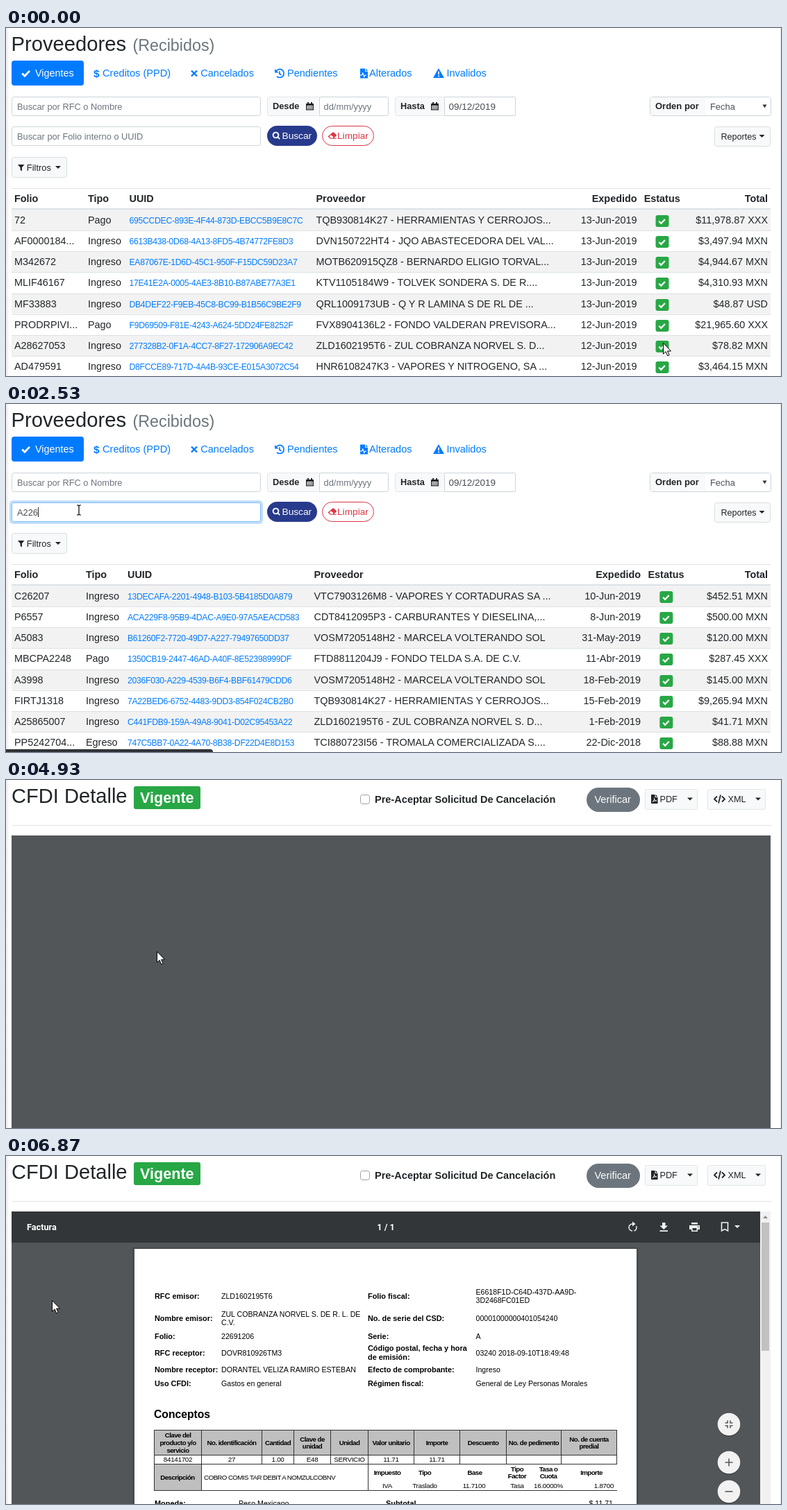
Animation of 1116x502 px, one loop 7.79 s. Source, as an HTML page:

```html
<!DOCTYPE html>
<html lang="es">
<head>
<meta charset="utf-8">
<title>Proveedores</title>
<style>
  html, body { margin: 0; width: 100%; height: 100%; overflow: hidden; background: #fff; }
  svg { display: block; width: 1116px; height: 502px; overflow: hidden; }
  text { font-family: "Liberation Sans", Arial, sans-serif; }
  .bold { font-weight: 700; }
  .end { text-anchor: end; }
  .mid { text-anchor: middle; }
  .tight { letter-spacing: -.55px; }
  .snug { letter-spacing: -.28px; }
  .roboto { font-family: Roboto, sans-serif; font-weight: 700; }
</style>
</head>
<body>
<svg id="stage" viewBox="0 0 1116 502"></svg>
<script>
const LOOP = 7790;
const INK = '#212529', BLUE = '#007bff', GREEN = '#28a745', RED = '#dc3545';
const MUTED = '#6c757d', LINE = '#dee2e6', LIGHT = '#f8f9fa', FIELD = '#ced4da';

// Drawing helpers
const text = (x, y, s, size = 14.4, fill = INK, cls = '') =>
  `<text x="${x}" y="${y}" font-size="${size}" fill="${fill}" class="${cls}">${s}</text>`;
const bold = (x, y, s, size, fill, cls = '') => text(x, y, s, size, fill, 'bold ' + cls);
const rect = (x, y, w, h, fill, r = 0, stroke = 'none') =>
  `<rect x="${x}" y="${y}" width="${w}" height="${h}" rx="${r}" fill="${fill}" stroke="${stroke}"/>`;
const box = (x1, y1, x2, y2, fill, r = 0, stroke = FIELD) =>
  rect(x1 + .5, y1 + .5, x2 - x1 - 1, y2 - y1 - 1, fill, r, stroke);
const shape = (x, y, d, fill, scale = 1) =>
  `<path transform="translate(${x} ${y}) scale(${scale})" d="${d}" fill="${fill}"/>`;
const stroke = (x, y, d, color, w = 2) =>
  `<path transform="translate(${x} ${y})" d="${d}" fill="none" stroke="${color}" stroke-width="${w}"/>`;
const group = (id, body) => `<g id="${id}">${body}</g>`;
const down = (x, y, color = INK) => shape(x, y, 'M0 0h8l-4 4z', color);
const tick = (x, y, s, color) => stroke(x, y, `M${-5 * s} 0l${3.6 * s} ${3.6 * s} ${6.6 * s} ${-7 * s}`, color, 2.6 * s);
const calendar = (x, y) =>
  shape(x, y, 'M0 2h2V0h2v2h3V0h2v2h2v9.5H0zM1.4 5v5.2h8.2V5zM2.4 6h1.7v1.2H2.4zM4.8 6h1.7v1.2H4.8zM7.2 6h1.7v1.2H7.2zM2.4 8.2h1.7v1.2H2.4zM4.8 8.2h1.7v1.2H4.8zM7.2 8.2h1.7v1.2H7.2z', INK);

const dateField = (x, label, inputX, endX, value, color, size) =>
  box(x, 99, endX, 127, LIGHT, 3, '#e3e6ea') + bold(x + 8, 117, label, 12.8) +
  calendar(inputX - 19, 107) + box(inputX, 99, endX, 127, '#fff', 2) + text(inputX + 6.5, 118, value, size, color);

const listLeft =
  text(7.5, 33, 'Proveedores', 29.2) + text(182.5, 33, '(Recibidos)', 23.3, MUTED) +
  rect(8, 47, 104, 36, BLUE, 4) + tick(28.5, 65.5, 1.05, '#fff') + text(42, 70, 'Vigentes', 14.4, '#fff') +
  bold(126, 71, '$', 15.5, BLUE) + text(139, 70, 'Creditos (PPD)', 14.6, BLUE) +
  stroke(271, 65.5, 'M-4-4L4 4M4-4L-4 4', BLUE, 2.4) + text(280.3, 70, 'Cancelados', 14.5, BLUE) +
  stroke(394, 65.5, 'M-4.8-3.4A6 6 0 1 1-4 4.3M-.2-3.2V.5l2.8 1.8', BLUE, 1.7) + shape(387, 59, 'M0 0V5.5H5.5z', BLUE) +
  text(405, 70, 'Pendientes', 14.5, BLUE) +
  shape(509, 58.5, 'M1 0h7v4.2h4V14H1z', BLUE) + shape(509, 58.5, 'M9 0l3 3.2H9z', BLUE) +
  stroke(509, 58.5, 'M0 9.5h3.5l1.3-3 2 5.5 1.3-2.5H10', '#fff', 1.1) + text(523, 70, 'Alterados', 14.6, BLUE) +
  shape(615, 58, 'M7.9 0L16 14H0zM7 4.8l.3 4.4h1.4L9 4.8zM7 10.4v1.8h2v-1.8z', BLUE) + text(634.5, 70, 'Invalidos', 14.5, BLUE) +
  box(8, 99, 367, 127, '#fff', 3) + text(16, 118, 'Buscar por RFC o Nombre', 12.8, MUTED) +
  dateField(376, 'Desde', 451, 551, 'dd/mm/yyyy', MUTED, 12.9) +
  dateField(560, 'Hasta', 631, 734, '09/12/2019', '#495057', 13.5) +
  box(8, 142, 367, 170, '#fff', 3) +
  rect(376, 141, 72, 29, '#283a8c', 14.5) +
  stroke(389, 154.5, 'M3.4 0A3.9 3.9 0 1 1-4.4 0A3.9 3.9 0 1 1 3.4 0M2.2 2.6L5.2 5.6', '#fff', 1.9) +
  text(397.5, 160, 'Buscar', 13.7, '#fff') +
  box(455, 141, 530, 170, '#fff', 14, RED) +
  shape(464, 150.5, 'M7.5 0h2l4.5 4.3v1.2L9.6 9.7H14V11H3.5L0 7.6V6.6zM4.6 4.3L1.9 7.1 4.3 9.6h2.8L9 7.9z', RED, .85) +
  text(477, 160, 'Limpiar', 13.7, RED) +
  box(8, 186, 88, 216, LIGHT, 3, '#d9dde0') + shape(17, 197, 'M0 0h10.5L6.6 4.8V10.5L4 8.5V4.8z', INK, .9) +
  text(29.8, 205.5, 'Filtros', 12.9) + down(71, 199);

const listRight =
  box(927, 99, 1102, 127, '#fff', 3) + rect(928, 100, 79, 26, LIGHT, 2) + bold(935, 117, 'Orden por', 13) +
  text(1014, 118, 'Fecha', 12.9, '#495057') + shape(1089.5, 110.5, 'M0 0h6l-3 4.8z', '#333') +
  box(1020, 142, 1101, 171, LIGHT, 3, '#d9dde0') + text(1029.5, 160.5, 'Reportes', 12.6) + down(1084.5, 154);

// cols: folio, tipo, uuid, proveedor, expedido (right), estatus, total (right), table end
function table([folio, tipo, uuid, prov, exp, est, total, end], rows, linkId = '') {
  const head = rect(8, 231, end - 8, 1, LINE) + rect(8, 260, end - 8, 2, LINE) +
    bold(folio, 251, 'Folio') + bold(tipo, 251, 'Tipo') + bold(uuid, 251, 'UUID') + bold(prov, 251, 'Proveedor') +
    bold(exp, 251, 'Expedido', 14.4, INK, 'end') + bold(est, 251, 'Estatus') + bold(total, 251, 'Total', 14.4, INK, 'end');
  return head + rows.map((row, i) => {
    const [f, ti, id, p, date, sum] = row.split('|');
    const y = 262 + i * 30.15, base = Math.round(y + 20);
    const link = text(uuid, base, id, 12.2, BLUE, 'snug');
    return rect(8, y, end - 8, 30.15, i % 2 ? '#fff' : '#f2f2f2') + (i ? rect(8, Math.round(y), end - 8, 1, LINE) : '') +
      text(folio, base, f) + text(tipo, base, ti) + (linkId && !i ? group(linkId, link) : link) + text(prov, base, p) +
      text(exp, base, date, 14.4, INK, 'end') + rect(est + 16.8, base - 12, 19, 17, GREEN, 3) +
      tick(est + 25.8, base - 3.2, .85, '#fff') + text(total, base, sum, 14.4, INK, 'end');
  }).join('');
}

const allRows = [
  '72|Pago|695CCDEC-893E-4F44-873D-EBCC5B9E8C7C|TQB930814K27 - HERRAMIENTAS Y CERROJOS...|13-Jun-2019|$11,978.87 XXX',
  'AF0000184...|Ingreso|6613B438-0D68-4A13-8FD5-4B74772FE8D3|DVN150722HT4 - JQO ABASTECEDORA DEL VAL...|13-Jun-2019|$3,497.94 MXN',
  'M342672|Ingreso|EA87067E-1D6D-45C1-950F-F15DC59D23A7|MOTB620915QZ8 - BERNARDO ELIGIO TORVAL...|13-Jun-2019|$4,944.67 MXN',
  'MLIF46167|Ingreso|17E41E2A-0005-4AE3-8B10-B87ABE77A3E1|KTV1105184W9 - TOLVEK SONDERA S. DE R....|13-Jun-2019|$4,310.93 MXN',
  'MF33883|Ingreso|DB4DEF22-F9EB-45C8-BC99-B1B56C9BE2F9|QRL1009173UB - Q Y R LAMINA S DE RL DE ...|13-Jun-2019|$48.87 USD',
  'PRODRPIVI...|Pago|F9D69509-F81E-4243-A624-5DD24FE8252F|FVX8904136L2 - FONDO VALDERAN PREVISORA...|12-Jun-2019|$21,965.60 XXX',
  'A28627053|Ingreso|277328B2-0F1A-4CC7-8F27-172906A9EC42|ZLD1602195T6 - ZUL COBRANZA NORVEL S. D...|12-Jun-2019|$78.82 MXN',
  'AD479591|Ingreso|D8FCCE89-717D-4A4B-93CE-E015A3072C54|HNR6108247K3 - VAPORES Y NITROGENO, SA ...|12-Jun-2019|$3,464.15 MXN'];
const someRows = [
  'C26207|Ingreso|13DECAFA-2201-4948-B103-5B4185D0A879|VTC7903126M8 - VAPORES Y CORTADURAS SA ...|10-Jun-2019|$452.51 MXN',
  'P6557|Ingreso|ACA229F8-95B9-4DAC-A9E0-97A5AEACD583|CDT8412095P3 - CARBURANTES Y DIESELINA,...|8-Jun-2019|$500.00 MXN',
  'A5083|Ingreso|B61260F2-7720-49D7-A227-79497650DD37|VOSM7205148H2 - MARCELA VOLTERANDO SOL|31-May-2019|$120.00 MXN',
  'MBCPA2248|Pago|1350CB19-2447-46AD-A40F-8E52398999DF|FTD8811204J9 - FONDO TELDA S.A. DE C.V.|11-Abr-2019|$287.45 XXX',
  'A3998|Ingreso|2036F030-A229-4539-B6F4-BBF61479CDD6|VOSM7205148H2 - MARCELA VOLTERANDO SOL|18-Feb-2019|$145.00 MXN',
  'FIRTJ1318|Ingreso|7A22BED6-6752-4483-9DD3-854F024CB2B0|TQB930814K27 - HERRAMIENTAS Y CERROJOS...|15-Feb-2019|$9,265.94 MXN',
  'A25865007|Ingreso|C441FDB9-159A-49A8-9041-D02C95453A22|ZLD1602195T6 - ZUL COBRANZA NORVEL S. D...|1-Feb-2019|$41.71 MXN',
  'PP5242704...|Egreso|747C5BB7-0A22-4A70-8B38-DF22D4E8D153|TCI880723I56 - TROMALA COMERCIALIZADA S....|22-Dic-2018|$88.88 MXN'];
const fewRows = [
  'A22691206|Ingreso|E6618F1D-C64D-437D-AA9D-3D2468FC01ED|ZLD1602195T6 - ZUL COBRANZA NORVEL S. D...|10-Sep-2018|$13.58 MXN',
  'FA22604|Ingreso|5C1A2264-80D1-4E7B-9F03-61B7D20C48AE|CDT8412095P3 - CARBURANTES Y DIESELINA,...|21-Ago-2018|$400.00 MXN',
  'P5120|Ingreso|A226E07B-43C9-4D15-8A62-0F9B3E715CD4|VTC7903126M8 - VAPORES Y CORTADURAS SA ...|14-Jun-2018|$318.20 MXN',
  'A2264|Ingreso|90D3F1B8-6E24-47A5-B1C7-2D85E06F9A31|VOSM7205148H2 - MARCELA VOLTERANDO SOL|3-May-2018|$120.00 MXN',
  'MLIF30218|Ingreso|3B7E5D90-A226-4C18-96FD-E41082B5C76A|KTV1105184W9 - TOLVEK SONDERA S. DE R....|18-Abr-2018|$2,150.36 MXN',
  'C18842|Pago|D4086CA2-2613-4B9F-85E7-7A1F50C3E92B|FTD8811204J9 - FONDO TELDA S.A. DE C.V.|9-Mar-2018|$287.45 XXX'];

const splitButton = (x, end, sep, label, labelX) =>
  box(x, 13, end, 43, LIGHT, 2, '#e2e6ea') + text(labelX, 32, label, 12.7) + down(sep + 7, 25.5);

const detail =
  text(8, 33, 'CFDI Detalle', 29.1) + rect(184, 9, 96, 33, GREEN, 3) + bold(193, 33, 'Vigente', 21.6, '#fff') +
  box(510, 21, 524, 35, '#fff', 3, '#9aa0a6') + bold(531, 33, 'Pre-Aceptar Solicitud De Cancelación', 14.55) +
  rect(836, 11, 77, 35, MUTED, 17.5) + text(847.5, 33, 'Verificar', 14.5, '#fff') +
  splitButton(920, 996, 974, 'PDF', 941.5) + shape(929, 21, 'M0 0h5.5v4H9.5v9H0zM6.5 0l3 3h-3z', INK) +
  stroke(929, 21, 'M2 10.5c2-1 2.8-4 2.4-5.2c0 2 1.6 3.6 3.4 3.6c-2-.2-4 .4-5.8 1.6', '#fff', .9) +
  splitButton(1010, 1094, 1072, 'XML', 1039.5) + stroke(1019, 27.5, 'M5-4L1 0 5 4M12-4L16 0 12 4M10-6L7 6', INK, 1.8) +
  rect(8, 65, 1094, 1, '#e5e5e5');

const toolbar =
  rect(8, 80, 1078, 45, '#323639') + text(30, 106.5, 'Factura', 12.7, '#fff', 'roboto') +
  text(547, 106.5, '1 / 1', 12.7, '#fff', 'roboto mid') +
  stroke(903, 103, 'M-1 5A5 5 0 0 1-1-5M1.5 5A5 5 0 0 0 4.5-2', '#f1f1f1', 1.5) + shape(902, 94.5, 'M0 0l4.5 3.5L0 7z', '#f1f1f1') +
  shape(941, 96, 'M4 0h4.5v4.5H12L6.2 10 .5 4.5H4zM.5 11.2H12V13H.5z', '#f1f1f1') +
  shape(984, 96, 'M3 0h9v2.5H3zM0 4h15v6h-3v3H3v-3H0zM4.5 8v3.6h6V8zM12 5.3v1.4h1.4V5.3z', '#f1f1f1') +
  stroke(1035, 102, 'M-4.5 6V-6H4.5V6L0 3.6z', '#f1f1f1', 1.6) + down(1049, 100, '#f1f1f1') +
  rect(1086, 80, 15, 422, '#f1f1f1') + rect(1088, 96, 11, 185, '#c1c1c1') + shape(1090, 86, 'M0 4h7L3.5 0z', '#8a8a8a');

const paper = rect(182, 132, 729, 380, '#484b4e') + rect(185, 134, 723, 380, '#fff');

const label = (x, y, s) => bold(x, y, s, 10.9, '#000');
const value = (x, y, s) => text(x, y, s, 10.6, '#000');
const cell = (x, y, s) => text(x, y, s, 9.8, '#000', 'mid snug');
const headCell = (x, y, ...lines) =>
  lines.map((s, i) => bold(x, y + (i - (lines.length - 1) / 2) * 10.8, s, 9.7, '#000', 'mid tight')).join('');
const edges = [213.5, 281.5, 368.5, 414.5, 467.5, 521.5, 587.5, 653.5, 720.5, 799.5, 879.5];
const heads = [['Clave del', 'producto y/o', 'servicio'], ['No. identificación'], ['Cantidad'], ['Clave de', 'unidad'],
  ['Unidad'], ['Valor unitario'], ['Importe'], ['Descuento'], ['No. de pedimento'], ['No. de cuenta', 'predial']];
const center = i => (edges[i] + edges[i + 1]) / 2;

const invoice =
  [[205.5, 'RFC emisor:', 'ZLD1602195T6'], [237.5, 'Nombre emisor:', ''], [264, 'Folio:', '22691206'],
   [287.5, 'RFC receptor:', 'DOVR810926TM3'], [311.5, 'Nombre receptor:', 'DORANTEL VELIZA RAMIRO ESTEBAN'],
   [331.5, 'Uso CFDI:', 'Gastos en general']].map(([y, a, b]) => label(214, y, a) + value(310, y, b)).join('') +
  value(310, 231.5, 'ZUL COBRANZA NORVEL S. DE R. L. DE') + value(310, 244, 'C.V.') +
  [[205.5, 'Folio fiscal:', ''], [237.5, 'No. de serie del CSD:', '00001000000401054240'], [264, 'Serie:', 'A'],
   [287.5, '', '03240 2018-09-10T18:49:48'], [311.5, 'Efecto de comprobante:', 'Ingreso'],
   [331.5, 'Régimen fiscal:', 'General de Ley Personas Morales']].map(([y, a, b]) => label(521, y, a) + value(676.5, y, b)).join('') +
  value(676.5, 199.5, 'E6618F1D-C64D-437D-AA9D-') + value(676.5, 212, '3D2468FC01ED') +
  label(521, 281, 'Código postal, fecha y hora') + label(521, 293.5, 'de emisión:') +
  bold(213, 378, 'Conceptos', 15.7, '#000') +
  rect(213, 395, 667, 36, '#bfbfbf') + rect(213, 444, 68, 38, '#bfbfbf') +
  stroke(0, 0, 'M213 395.5H880M213 431.5H880M213 444.5H880M213 482.5H880' + edges.map(x => `M${x} 395V444`).join('') +
    'M213.5 444V482M281.5 444V482M521.5 444V482', '#333', 1) +
  heads.map((lines, i) => headCell(center(i), 417, ...lines)).join('') +
  ['84141702', '27', '1.00', 'E48', 'SERVICIO', '11.71', '11.71'].map((s, i) => cell(center(i), 441, s)).join('') +
  headCell(247, 466.5, 'Descripción') +
  text(285, 466.5, 'COBRO COMIS TAR DEBIT A NOMZULCOBNV', 9.7, '#000', 'tight') +
  headCell(549, 460, 'Impuesto') + headCell(603, 460, 'Tipo') + headCell(675, 460, 'Base') +
  headCell(736, 460, 'Tipo', 'Factor') + headCell(781, 460, 'Tasa o', 'Cuota') + headCell(843, 460, 'Importe') +
  cell(549, 478.5, 'IVA') + cell(603, 478.5, 'Traslado') + cell(674, 478.5, '11.7100') + cell(736, 478.5, 'Tasa') +
  cell(781, 478.5, '16.0000%') + cell(861, 478.5, '1.8700') +
  label(214, 505, 'Moneda:') + value(335, 505, 'Peso Mexicano') + label(547, 505, 'Subtotal') +
  text(874, 505, '$ 11.71', 10.6, '#000', 'end');

const knob = (y, d) => `<circle cx="1041" cy="${y + 1.2}" r="16.5" fill="#000" opacity=".25"/>` +
  `<circle cx="1041" cy="${y}" r="16.3" fill="#f2f2f2"/>` + stroke(1041, y, d, '#5a5a5a', 1.6);
const knobs = knob(387, 'M-5.5-2H-2V-5.5M5.5-2H2V-5.5M-5.5 2H-2V5.5M5.5 2H2V5.5') +
  knob(442, 'M-5.5 0H5.5M0-5.5V5.5') + knob(484, 'M-5.5 0H5.5');

const stage = document.getElementById('stage');
stage.innerHTML =
  '<defs><linearGradient id="shade"><stop stop-color="#ececec"/><stop offset="1" stop-color="#fff"/></linearGradient></defs>' +
  rect(0, 0, 1116, 502, '#fff') + rect(0, 0, 5, 502, 'url(#shade)') + group('edge', rect(1115, 0, 1, 502, '#e6e6e6')) +
  group('list', listLeft + group('listRight', listRight) +
    group('focus', rect(6.5, 140.5, 362, 31, 'none', 4, '#bfdeff" stroke-width="3') + box(8, 142, 367, 170, '#fff', 3, '#80bdff')) +
    '<text id="query" x="16" y="160.5" font-size="12.8"></text>' +
    rect(0, 149, 1, 14, '#222').replace('<rect', '<rect id="caret"') +
    group('all', table([12, 118, 177.5, 446.5, 908.5, 918.7, 1097, 1101], allRows)) +
    group('some', table([12, 115, 175, 443.5, 914, 924.5, 1097, 1101], someRows)) +
    group('few', table([12, 124, 186.5, 461, 929, 940, 1114, 1116], fewRows, 'link'))) +
  group('detail', detail) + group('viewer', rect(8, 80, 1093, 422, '#525659')) +
  group('paper', paper) + group('invoice', invoice) + group('toolbar', toolbar) + group('knobs', knobs) +
  '<path id="strip" fill="#2f3338"/>' +
  group('cursor',
    group('arrow', '<path d="M.5.5V16.2L4.1 12.8 6.7 18.8 9.1 17.8 6.6 12H11.5Z" fill="#fff" stroke="#000"/>') +
    group('ibeam', stroke(0, 0, 'M-3-7H-1L0-6 1-7H3M0-6V6M-3 7H-1L0 6 1 7H3', '#000', 1.2)) +
    group('hand', '<path d="M-1.5 9V1.5a1.5 1.5 0 0 1 3 0V6l7 1.8q1.5.5 1.3 2.2L8.5 18H0L-5 11.5q0-2 2-1.5z" fill="#fff" stroke="#000"/>'));

const el = {};
stage.querySelectorAll('[id]').forEach(n => el[n.id] = n);
const show = (id, on) => { el[id].style.display = on ? '' : 'none'; };
const at = (steps, t) => steps.reduce((v, s) => t >= s[0] ? s[1] : v, steps[0][1]);

// start, end, number of steps, destination
const moves = [
  [70, 470, 7, 97, 158], [670, 930, 5, 105, 153], [3130, 3470, 6, 190, 262], [3530, 3870, 6, 217, 276],
  [4130, 4330, 4, 213, 264], [4530, 4930, 7, 217, 247], [5000, 5070, 2, 219, 247], [6600, 6870, 5, 66, 208]];
const kinds = [[0, 'arrow'], [470, 'ibeam'], [3200, 'arrow'], [3670, 'hand'], [4130, 'arrow']];
const queries = [[0, ''], [1470, 'A'], [2000, 'A2'], [2130, 'A22'], [2470, 'A226']];
const tables = [[0, 'all'], [2270, 'some'], [2930, 'few']];
const strips = [[0, 0], [1600, 298], [1930, 0], [2530, 298], [2930, 0], [3670, 298], [4470, 203], [4530, 0], [5070, 298], [5470, 0]];
const stripFade = [[0, 1], [5330, .66], [5400, .33], [5470, 1]];

function pointer(t) {
  let x = 946, y = 454;
  for (const [start, end, n, toX, toY] of moves) {
    if (t < start) break;
    const k = Math.min(n, 1 + Math.floor((t - start) / (end - start) * (n - 1) + 1e-6)) / n;
    const p = k * k * (3 - 2 * k);
    x += (toX - x) * p;
    y += (toY - y) * p;
  }
  return [Math.round(x), Math.round(y)];
}

function render(t) {
  const onList = t < 4130, wide = onList && t >= 2930, focus = Math.min(1, Math.max(0, (t - 730) / 140));
  show('list', onList);
  show('detail', !onList);
  show('edge', !wide);
  el.listRight.setAttribute('transform', `translate(${wide ? 17 : 0} 0)`);
  for (const id of ['all', 'some', 'few']) show(id, at(tables, t) === id);
  el.focus.style.opacity = focus;

  const q = at(queries, t);
  el.query.textContent = q || 'Buscar por Folio interno o UUID';
  el.query.setAttribute('fill', q ? '#495057' : MUTED);
  el.caret.setAttribute('x', q ? Math.round(16 + 12.8 * (.667 + .556 * (q.length - 1))) : 16);
  const blinkFrom = at([[0, 740], [1470, 1470], [2000, 2000], [2470, 2470]], t);
  show('caret', t >= 740 && (t - blinkFrom) % 1060 < 530);

  const hover = t >= 3670;
  el.link.firstChild.setAttribute('fill', hover ? '#0056b3' : BLUE);
  el.link.firstChild.setAttribute('text-decoration', hover ? 'underline' : 'none');

  show('viewer', t >= 4600);
  show('knobs', t >= 5670);
  el.knobs.setAttribute('transform', `translate(${t < 5870 ? 7.5 : 0} 0)`);
  show('toolbar', t >= 5870);
  show('paper', t >= 5940);
  show('invoice', t >= 6070);

  const w = at(strips, t);
  el.strip.setAttribute('d', w ? `M0 498H${w - 4}q4 0 4 4H0z` : '');
  el.strip.style.opacity = at(stripFade, t);

  const kind = at(kinds, t);
  for (const id of ['arrow', 'ibeam', 'hand']) show(id, id === kind);
  el.cursor.setAttribute('transform', `translate(${pointer(t)})`);
}

const start = performance.now();
function tickFrame() {
  render((performance.now() - start) % LOOP);
  requestAnimationFrame(tickFrame);
}
tickFrame();
</script>
</body>
</html>
```
